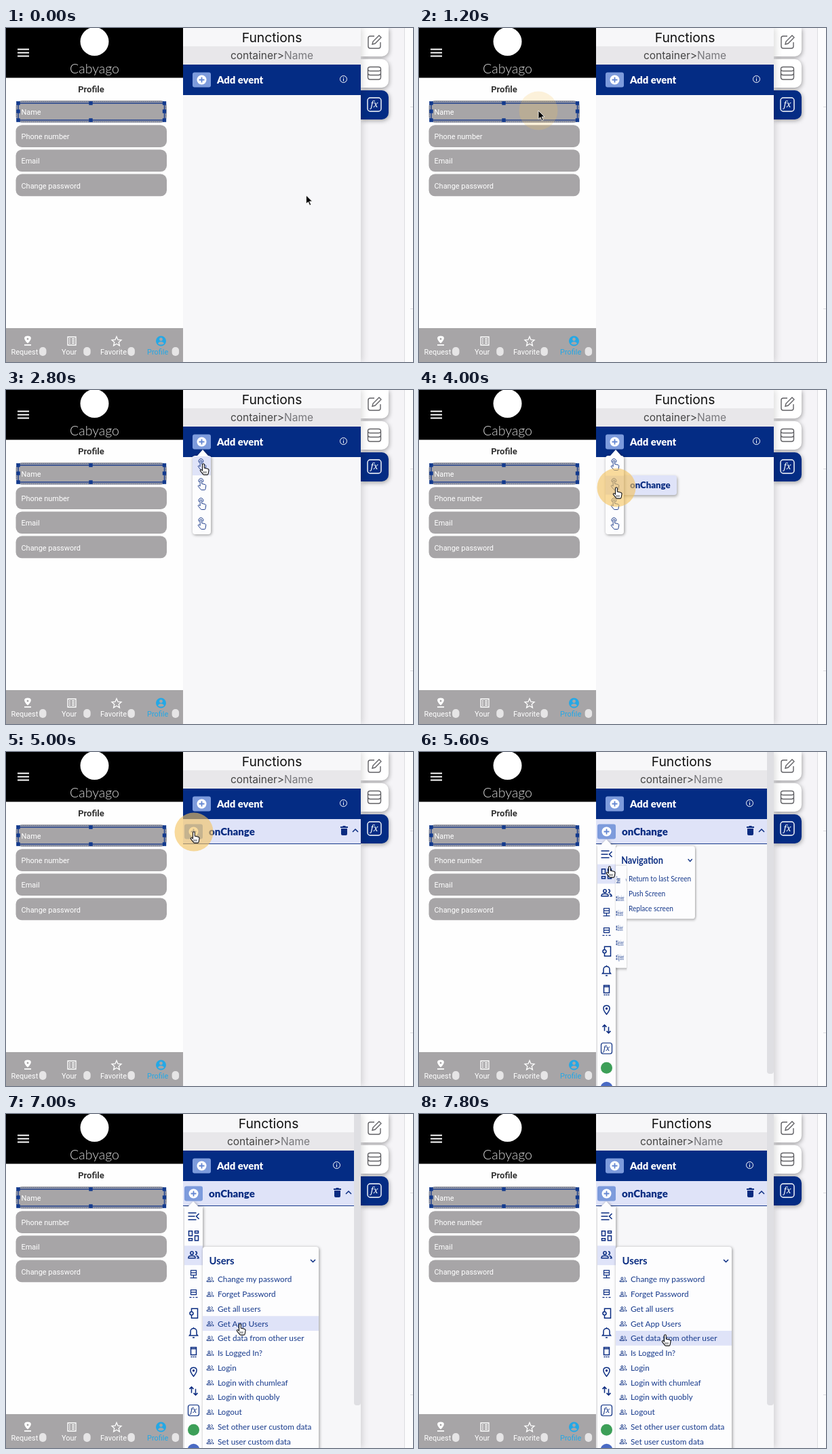
An HTML page that plays this animation: 600x493 px, repeating every 8000 ms.

```html
<!DOCTYPE html>
<html lang="en">
<head>
<meta charset="utf-8">
<title>Event editor</title>
<style>
  html, body { margin: 0; width: 100%; height: 100%; overflow: hidden; background: #f5f5f7; }
  svg { display: block; width: 100%; height: 100%; }
  text { font-family: Roboto, sans-serif; font-size: 10.95px; }
  .heading { font-family: Inter, sans-serif; text-anchor: middle; }
  .bold { font-family: Lato, sans-serif; font-weight: 900; font-size: 15px; fill: #082b80; }
  .title { font-size: 14.8px; font-weight: 700; }
  .item { font-family: Lato, sans-serif; font-size: 11.75px; fill: #173a8c; }
  .icon { fill: none; stroke: #082b80; stroke-width: 1.5; }
  .fx { font: italic 11px "Noto Serif", serif; text-anchor: middle; stroke: none; }
  .card { fill: #fdfdfe; filter: drop-shadow(1px 1px 2px #0006); }
  .hover { fill: #dfe3f8; }
  .white { fill: none; stroke: #fff; stroke-width: 1.5; }
</style>
</head>
<body>
<svg viewBox="0 0 600 493" preserveAspectRatio="none">
  <defs>
    <path id="hand" d="M-1.5 1c0-1.6 2.8-1.6 2.8 0v5l5 1.2c1.5.4 1.9 1.2 1.7 2.6l-.9 5c-.1.8-.5 1.3-1.2 1.3h-5c-.6 0-1-.3-1.4-.8l-4-5c-.8-1 .6-2.3 1.7-1.4l1.3 1z"/>
    <g id="people">
      <circle cx="-2.5" cy="-3" r="2.2"/>
      <path d="M-7.5 4.500v-1c0-3.500 10-3.500 10 0v1zM2.500-5.300c3.200 0 3.200 4.600 0 4.600M4 1c2.500.5 3.500 1.200 3.500 3.500h-2.500"/>
    </g>
    <g id="plus">
      <rect width="27" height="22" rx="3" fill="#7d9bdc"/>
      <circle cx="13.500" cy="11" r="7" fill="#fff"/>
      <path d="M9.500 11h8M13.500 7v8" stroke="#6487d2" stroke-width="1.8"/>
    </g>
  </defs>

  <!-- Workspace edge and tool tabs -->
  <rect x="523" width="77" height="493" fill="#f5f4f7"/>
  <rect x="588" width="12" height="493" fill="#fcfcfd"/>
  <path d="M587.500 0V493M596 116.500h4M596 414.500h4" stroke="#dcdce0"/>
  <g style="filter:drop-shadow(1px 2px 3px #0005)">
    <path d="M523 0h41v32a10 10 0 0 1-10 10h-31zM523 46h31a10 10 0 0 1 10 10v22a10 10 0 0 1-10 10h-31z" fill="#fff"/>
    <path d="M523 92h31a10 10 0 0 1 10 10v23a10 10 0 0 1-10 10h-31z" fill="#042c84"/>
  </g>
  <g fill="none" stroke="#626266" stroke-width="1.400">
    <path d="M543 12h-6q-3 0-3 3v12q0 3 3 3h12q3 0 3-3v-6M540 24l1-4 9-9 3 3-9 9z"/>
    <path d="M537 57.500h12q3.500 0 3.500 3t-3.500 3h-12q-3.500 0-3.500-3t3.500-3zM533.500 60.500v12q0 3.500 3.500 3.500h12q3.500 0 3.500-3.500v-12M533.500 66q0 3.500 3.500 3.500h12q3.500 0 3.500-3.500"/>
    <rect x="533" y="103" width="20" height="20" rx="4" stroke="#fff"/>
  </g>
  <text class="fx" x="543" y="117" style="font-size:13px" fill="#fff">fx</text>

  <!-- Functions panel -->
  <rect x="261" width="262" height="493" fill="#f7f7f9" style="filter:drop-shadow(3px 0 5px #0002)"/>
  <rect x="261" y="27" width="262" height="28" fill="#e8e7ea"/>
  <g id="titles">
    <text class="heading" x="387" y="20.500" style="font-size:19.300px" fill="#111">Functions</text>
    <text class="heading" x="387" y="46" style="font-size:15.500px" fill="#444">container&gt;<tspan fill="#77777b">Name</tspan></text>
  </g>
  <rect x="261" y="54" width="262" height="45" fill="#042c84"/>
  <use href="#plus" x="275" y="65.500"/>
  <text class="bold" x="311" y="82" style="font-size:14.800px;fill:#fff">Add event</text>

  <g id="eventRow">
    <rect x="261" y="99" width="262" height="36" class="hover"/>
    <path d="M261 135.500h262" stroke="#173a8c"/>
    <use href="#plus" x="263" y="106.500"/>
    <text class="bold" x="299" y="123">onChange</text>
  </g>
  <g id="edgeTools">
    <circle cx="487.500" cy="75.500" r="5" class="white" style="stroke-width:1"/>
    <path d="M487.500 74.500v4M487.500 72.500v1" stroke="#fff"/>
    <g id="rowTools">
      <path d="M484 113h9v8q0 2-2 2h-5q-2 0-2-2zM483 110h3l1-1h3l1 1h3v2h-11z" fill="#082b80"/>
      <path d="M501 118l4-4 4 4" class="icon"/>
    </g>
  </g>
  <rect id="scrollbar" x="513" y="-5" width="10" rx="4" fill="#dfdfe3"/>

  <g id="popup">
    <g id="tooltip">
      <rect x="290" y="126" width="90" height="29" rx="4" class="hover" style="filter:drop-shadow(1px 2px 2px #0005)"/>
      <text class="bold" x="311" y="145" style="font-size:13.200px">onChange</text>
    </g>
    <path d="M282 97l8-9 8 9h0q4 0 4 4v108q0 4-4 4h-19q-4 0-4-4v-108q0-4 4-4z" class="card"/>
    <rect id="popupHover" x="275" width="27" height="28" class="hover"/>
    <g id="touches"></g>
  </g>

  <g id="sideMenu">
    <path d="M263 137h5l8-8 8 8h6v360h-27z" class="card"/>
    <rect id="sideHover" x="263" width="27" height="28.700" class="hover"/>
    <g id="sideIcons" class="icon"></g>
  </g>
  <g id="submenus"></g>

  <!-- Phone preview -->
  <rect width="261" height="493" fill="#fefefe"/>
  <rect width="261" height="73.500" fill="#000"/>
  <path d="M17 31.500h17M17 36.500h17M17 41.500h17" class="white" style="stroke-width:2"/>
  <circle cx="130.500" cy="20" r="21" fill="#fff"/>
  <text x="130.500" y="67" text-anchor="middle" fill="#d8d8d8" style="font:300 19.500px Lato,sans-serif">Cabyago</text>
  <text x="125.500" y="95" text-anchor="middle" fill="#333" style="font-weight:700;font-size:13px">Profile</text>
  <g id="fields"></g>
  <g fill="none" stroke="#173a8c">
    <rect x="15.500" y="108.500" width="220" height="30" stroke-width=".6" stroke-dasharray="2 1"/>
    <rect x="18" y="111" width="215.500" height="25" stroke-width="1.400"/>
  </g>
  <g id="handles" fill="#123a8e"></g>
  <rect y="443" width="261" height="50" fill="#a7a5a7"/>
  <path d="M32 465.500c-7-6.500-6-11 0-11s7 4.500 0 11zM27 467h10v1.800h-10z" fill="#fff"/>
  <circle cx="32" cy="459" r="1.400" fill="#a7a5a7"/>
  <path d="M91 456h12v12h-12zM93 459h2M97 459h4M93 462h2M97 462h4M93 465h2M97 465h4" class="white" style="stroke-width:1.300"/>
  <path d="M163 455.500l2 4.700 5 .4-3.800 3.300 1.200 5-4.400-2.700-4.400 2.700 1.200-5-3.800-3.300 5-.4z" class="white" style="stroke-width:1.300"/>
  <circle cx="228.500" cy="462" r="7.500" fill="#24a8e6"/>
  <circle cx="228.500" cy="459.500" r="2.400" fill="#a7a5a7"/>
  <path d="M224 466c1-4 8-4 9 0q-4.500 3-9 0z" fill="#a7a5a7"/>
  <g id="navLabels"></g>

  <circle id="halo" r="28.500" fill="#f5c45c"/>
  <path id="arrow" d="M0 0v12.500l3-2.800 2.200 5 2-.9-2.200-4.800h4z" fill="#000" stroke="#fff" stroke-width=".8"/>
  <g id="pointer" stroke="#111">
    <use href="#hand" fill="#fff" stroke-width="1.100"/>
    <path d="M2 11v3M4 11v3M0 11v3" stroke-width=".7"/>
  </g>
</svg>

<script>
const LOOP = 8000, STEP = 200;
const $ = id => document.getElementById(id);
const fill = (id, items, make) => { $(id).innerHTML = items.map(make).join(''); };

fill('fields', ['Name', 'Phone number', 'Email', 'Change password'], (label, i) => {
  const y = 107 + i * 36.2;
  return `<rect x="14.5" y="${y}" width="222.5" height="32.7" rx="9" fill="#a7a5a7"/>
    <text x="22.5" y="${y + 21}" fill="#fff">${label}</text>`;
});
fill('handles', [[18, 111], [125, 111], [233.5, 111], [18, 123], [233.5, 123], [18, 136], [125, 136], [233.5, 136]],
  ([x, y]) => `<rect x="${x - 2.7}" y="${y - 2.7}" width="5.4" height="5.4"/>`);
fill('navLabels', [['Request', 7.5], ['Your', 82], ['Favorite', 139], ['Profile', 208]], ([label, x], i) =>
  `<text x="${x}" y="482" fill="${i === 3 ? '#24a8e6' : '#fff'}">${label}</text>
   <rect x="${49 + i * 65.2}" y="471" width="10.5" height="13" rx="5" fill="#e6e5e6"/>`);
fill('touches', [110, 139, 168, 197], y =>
  `<g class="icon" style="stroke-width:1" transform="translate(287.5 ${y - 6}) scale(.9)">
    <use href="#hand"/><path d="M-3 3.500a3.800 3.800 0 1 1 5.800 0"/></g>`);

const sideIcons = [
  '<path d="M-8-5H4M-8 0H2M-8 5H4M8-4L4 0l4 4"/>',
  '<path d="M-7-7h5v7h-5zM2-7h5v3h-5zM2 0h5v7h-5zM-7 4h5v3h-5z"/>',
  '<use href="#people"/>',
  '<path d="M-4-6h8v3.500h-8zM-4-2.500h8v3.500h-8zM0 1v4M-5 5h10" stroke-width="1.200"/>',
  '<path d="M-4-6h8v3.500h-8zM-4-2.500h8v3.500h-8zM-6 5h3M-1 5h2M3 5h3" stroke-width="1.200"/>',
  '<path d="M-3-3v-4h9v14h-9v-4"/><circle cx="-3" r="2.500"/>',
  '<path d="M-6 4h12l-1.500-2v-4c0-6-9-6-9 0v4zM-1.500 7h3M0-8v2"/>',
  '<path d="M-4-7h8v11h-8zM-4-5h8M-4 7h2M-1 7h2M2 7h2"/>',
  '<path d="M0 7c-7-8-5-13 0-13s7 5 0 13z"/><circle cy="-1.500" r="1"/>',
  '<path d="M-3 3v-9M-6-3l3-3 3 3M3-3v9M0 3l3 3 3-3"/>',
  '<rect x="-8" y="-8" width="16" height="16" rx="3" stroke-width="1.200"/><text class="fx" y="3" fill="#082b80">fx</text>',
  '<circle r="8.500" fill="#3d9f58" stroke="none"/>',
  '<circle cy="1" r="9" fill="#4a6bc4" stroke="none"/>'
];
fill('sideIcons', sideIcons, (art, i) => `<g transform="translate(276.5 ${151 + i * 28.65})">${art}</g>`);

const ROW = 21.75, MENU_X = 290;
const submenus = [
  { id: 'navigation', y: 151, right: 426, title: 'Navigation',
    items: ['Return to last Screen', 'Push Screen', 'Replace screen'] },
  { id: 'screens', y: 180, right: 426, title: 'Screen',
    items: ['Return element', 'Hide element', 'Edit element', 'Reset element', 'Toggle element'] },
  { id: 'users', y: 208, right: 461, title: 'Users',
    items: ['Change my password', 'Forget Password', 'Get all users', 'Get App Users', 'Get data from other user',
      'Is Logged In?', 'Login', 'Login with chumleaf', 'Login with quobly', 'Logout',
      'Set other user custom data', 'Set user custom data'] }
];
fill('submenus', submenus, m => `<g id="${m.id}">
  <rect x="${MENU_X}" y="${m.y - 12}" width="${m.right - MENU_X}" height="${m.items.length * ROW + 42}" rx="4" class="card"/>
  ${m.id === 'users' ? `<rect id="userHover" x="${MENU_X}" width="171" height="${ROW}" class="hover"/>` : ''}
  <text class="bold title" x="299.5" y="${m.y + 14}">${m.title}</text>
  <path d="M${m.right - 12} ${m.y + 7}l3.500 3.500 3.500-3.500" class="icon"/>
  ${m.items.map((label, i) => {
    const y = m.y + 36 + i * ROW;
    return `<use href="#people" class="icon" transform="translate(301 ${y + .5}) scale(.66)"/>
      <text class="item" x="312" y="${y + 4.3}">${label}</text>`;
  }).join('')}</g>`);

// Cursor stops: time, x, y
const path = [
  [0, 442.5, 247], [200, 442.5, 247], [800, 176, 122], [1400, 176, 122], [2200, 288, 76], [2400, 288, 76],
  [2800, 291, 109], [3000, 291, 109], [3400, 291, 160], [3800, 291, 144], [4200, 291, 144],
  [4800, 277, 118], [5200, 277, 118], [5400, 278, 150], [5600, 281, 169], [5800, 280, 180],
  [6200, 280, 205], [6400, 282, 206], [6800, 330, 242], [7200, 360, 378], [7400, 362, 350],
  [7600, 363, 280], [7800, 363, 326], [8000, 363, 326]
];
const clicks = [800, 2200, 4000, 5000];
const fade = [.6, .42, .22];

function cursorAt(t) {
  const i = path.findIndex(p => p[0] > t);
  const [t0, x0, y0] = path[i - 1], [t1, x1, y1] = path[i];
  const k = (t - t0) / (t1 - t0), ease = k * k * (3 - 2 * k);
  return [x0 + (x1 - x0) * ease, y0 + (y1 - y0) * ease];
}
const show = (id, on) => { $(id).style.display = on ? '' : 'none'; };
const place = (id, x, y = 0) => $(id).setAttribute('transform', `translate(${x} ${y})`);
const unfold = (id, k) => $(id).setAttribute('transform', `translate(${MENU_X * (1 - k)} 0) scale(${k} 1)`);

function render(t) {
  const [x, y] = cursorAt(t);
  const menuOpen = t >= 5200, usersOpen = t >= 6200, hand = t >= 2200;

  show('popup', t >= 2400 && t < 4400);
  const option = Math.floor((y - 97) / 29);
  show('popupHover', option >= 0);
  $('popupHover').setAttribute('y', 98 + option * 28.5);
  show('tooltip', option === 1);

  show('eventRow', t >= 4400);
  show('rowTools', t >= 4400);
  show('scrollbar', menuOpen);
  $('scrollbar').setAttribute('height', usersOpen ? 435 : 480);
  place('titles', menuOpen ? 0 : 5);
  place('edgeTools', menuOpen ? 0 : 10);

  show('sideMenu', menuOpen);
  const section = usersOpen ? 2 : Math.floor((y - 137) / 28.7);
  show('sideHover', section >= 0);
  $('sideHover').setAttribute('y', 137 + section * 28.7);

  // One submenu folds away while the next unfolds
  show('navigation', t >= 5400 && t < 5800);
  unfold('navigation', t < 5600 ? 1 : .86);
  show('screens', t >= 5600 && !usersOpen);
  unfold('screens', t < 5800 ? .12 : 1);
  show('users', usersOpen);
  const row = Math.floor((y - 233) / ROW);
  show('userHover', row >= 0 && x > MENU_X);
  $('userHover').setAttribute('y', 233 + row * ROW);

  const click = clicks.find(c => t >= c && t < c + fade.length * STEP);
  show('halo', click !== undefined);
  if (click !== undefined) $('halo').setAttribute('opacity', fade[(t - click) / STEP]);
  show('arrow', !hand);
  show('pointer', hand);
  for (const id of ['halo', 'arrow', 'pointer']) place(id, x, y);
}

function tick() {
  render(Math.floor(performance.now() % LOOP / STEP) * STEP);
  requestAnimationFrame(tick);
}
tick();
</script>
</body>
</html>
```
